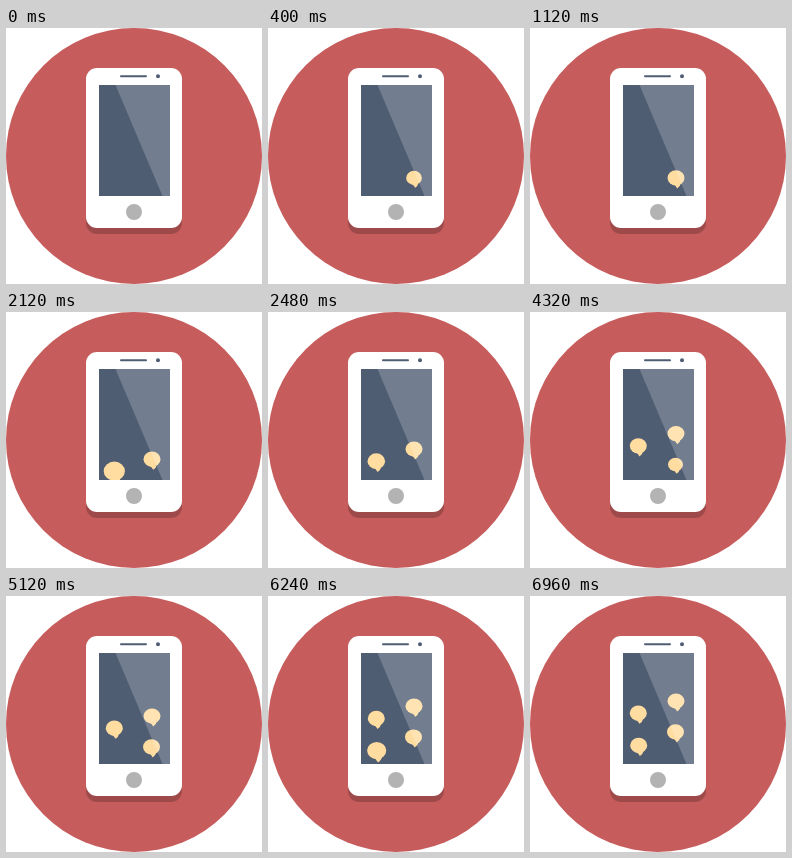
Recreate the animation shown at these times as an HTML page. Size 256 by 256 pixels, loop 7.04 s.

```html
<!DOCTYPE html>
<html lang="en">
<head>
<meta charset="utf-8">
<title>Phone chat</title>
<style>
  html, body { margin: 0; width: 100%; height: 100%; overflow: hidden; background: #fff; }
  svg { display: block; width: 100vw; height: 100vh; }
</style>
</head>
<body>
<svg viewBox="0 0 256 256">
  <defs>
    <clipPath id="screen"><rect x="93" y="57" width="71" height="111"/></clipPath>
    <g id="bubble" fill="#ffdc9f">
      <ellipse rx="8.5" ry="7.6"/>
      <path d="M-3.5 6 Q0 7.5 1.2 10.6 Q4.2 9 5 5Z"/>
    </g>
  </defs>
  <circle cx="128" cy="128" r="128" fill="#c75c5c"/>
  <rect x="80" y="46" width="96" height="160" rx="11" fill="#9f4a4a"/>
  <rect x="80" y="40" width="96" height="160" rx="11" fill="#fff"/>
  <rect x="93" y="57" width="71" height="111" fill="#4f5d73"/>
  <g id="chat" clip-path="url(#screen)"></g>
  <path d="M109.5 57H164V168H156.5Z" fill="#fff" fill-opacity=".2"/>
  <path d="M115 48.2H140" stroke="#4f5d73" stroke-width="2" stroke-linecap="round"/>
  <circle cx="152" cy="48.2" r="2" fill="#4f5d73"/>
  <circle cx="128" cy="184" r="8" fill="#b3b3b3"/>
</svg>
<script>
  const LOOP = 7040, STEP = 40, POP = 1200, SLIDE = 400;

  // Each message pushes the chat up by `push` pixels.
  const messages = [
    { at: 0,    x: 146,   y: 149.8, push: 0 },
    { at: 2000, x: 108.3, y: 149.2, push: 12.8 },
    { at: 4000, x: 145.5, y: 150.8, push: 17 },
    { at: 6000, x: 108.7, y: 149.4, push: 15 }
  ];

  const clamp = v => Math.min(1, Math.max(0, v));
  const swing = p => 0.5 - Math.cos(p * Math.PI) / 2;
  const elastic = p => p <= 0 ? 0 : p >= 1 ? 1 :
    1 + 2 ** (-10 * p) * Math.sin((p - 0.075) * 2 * Math.PI / 0.3);

  const chat = document.getElementById('chat');
  for (const m of messages) {
    m.el = document.createElementNS('http://www.w3.org/2000/svg', 'use');
    m.el.setAttribute('href', '#bubble');
    chat.append(m.el);
  }

  function draw(t) {
    messages.forEach((m, i) => {
      const size = elastic(clamp((t - m.at) / POP));
      let y = m.y + m.push;
      for (const { at, push } of messages.slice(i)) {
        y -= push * swing(clamp((t - at) / SLIDE));
      }
      m.el.setAttribute('transform',
        `translate(${m.x} ${y + 1}) scale(${size}) translate(0 -1)`);
      m.el.setAttribute('visibility', size > 0 ? 'visible' : 'hidden');
    });
  }

  const start = performance.now();
  function tick() {
    const t = (performance.now() - start) % LOOP;
    draw(Math.floor(t / STEP) * STEP);
    requestAnimationFrame(tick);
  }
  tick();
</script>
</body>
</html>
```
